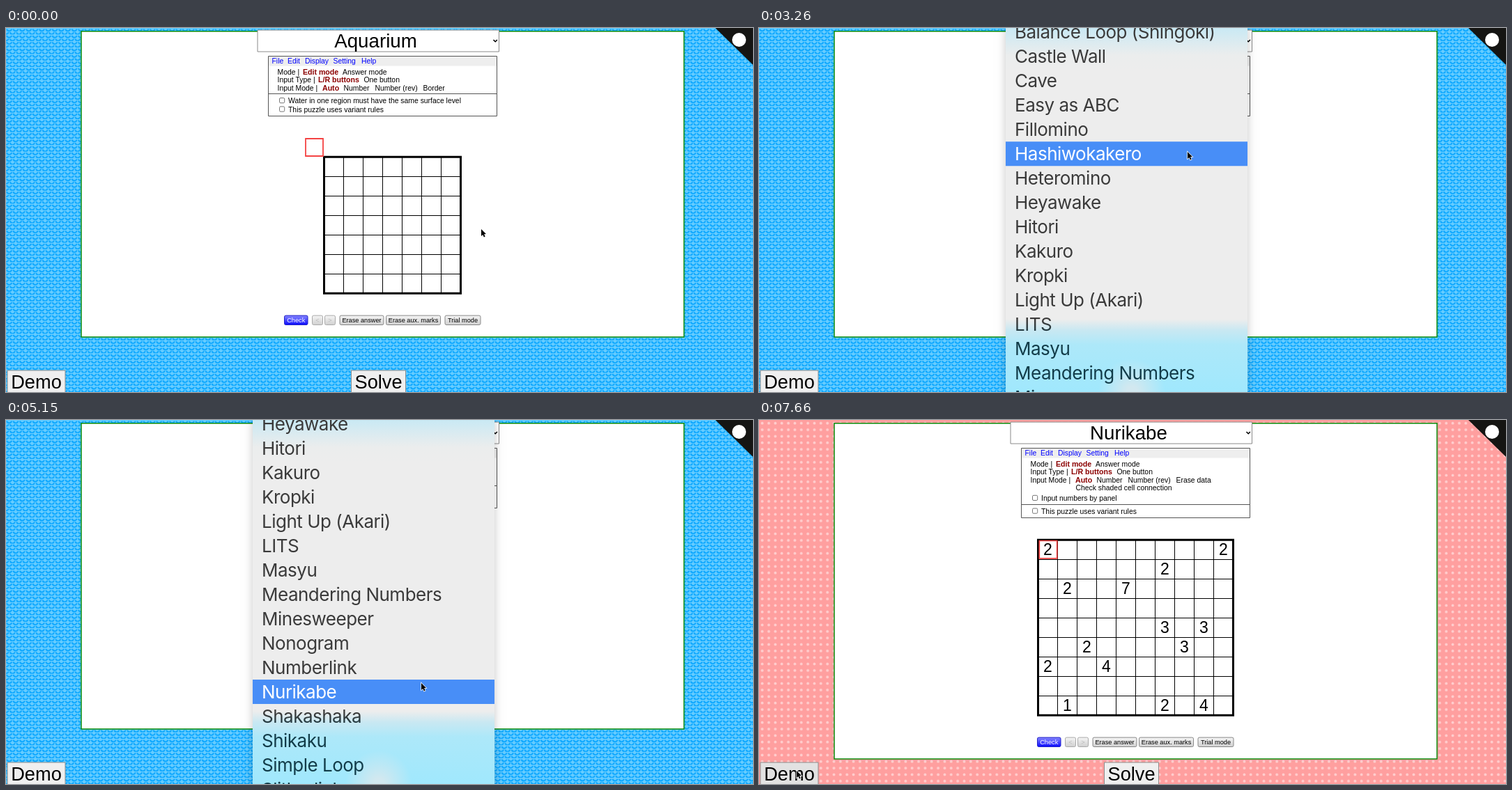
These frames come from a looping animation (1072 by 523 pixels, 8000 ms). An HTML page with a canvas:

```html
<!DOCTYPE html>
<html lang="en">
<head>
<meta charset="utf-8">
<title>Puzzle editor</title>
<style>
html, body { margin: 0; height: 100%; overflow: hidden; }
canvas { display: block; }
</style>
</head>
<body>
<canvas id="stage" width="1072" height="523"></canvas>
<script>
const c = document.getElementById('stage').getContext('2d');
const SANS = '"Liberation Sans", Arial, sans-serif';
const LOOP = 8000, TICK = 147.1;
const ROW = 34.95, MENU_TOP = 12, CELL = 28;

const NAMES = ['Aquarium', 'Balance Loop (Shingoki)', 'Castle Wall', 'Cave', 'Easy as ABC',
  'Fillomino', 'Hashiwokakero', 'Heteromino', 'Heyawake', 'Hitori', 'Kakuro', 'Kropki',
  'Light Up (Akari)', 'LITS', 'Masyu', 'Meandering Numbers', 'Minesweeper', 'Nonogram',
  'Numberlink', 'Nurikabe', 'Shakashaka', 'Shikaku', 'Simple Loop', 'Slitherlink', 'Spiral Galaxies'];

// One string per board row; dots are empty cells.
const CLUES = ['2........2', '......2...', '.2..7.....', '', '......3.3.',
  '..2....3..', '2..4......', '', '.1....2.4.'];

// Keys are [tick, ...values]
const POINTER = [[2, 682, 289], [6, 606, 24], [13, 606, 24], [20, 615, 178], [22, 615, 178],
  [27, 614, 184], [29, 614, 184], [35, 596, 378], [41, 596, 378], [50, 54, 504]];
const SCROLL = [[18, 0], [22, 58.5], [27, 221.5], [30, 303]];

const linear = u => u;
const smooth = u => u * u * (3 - 2 * u);

function track(keys, k, ease) {
  if (k <= keys[0][0]) return keys[0].slice(1);
  const i = keys.findIndex(key => key[0] >= k);
  if (i < 0) return keys[keys.length - 1].slice(1);
  const a = keys[i - 1], b = keys[i], u = ease((k - a[0]) / (b[0] - a[0]));
  return a.slice(1).map((v, j) => v + (b[j + 1] - v) * u);
}

function makePattern(paint) {
  const tile = document.createElement('canvas');
  tile.width = tile.height = 12;
  paint(tile.getContext('2d'));
  const pattern = c.createPattern(tile, 'repeat');
  pattern.setTransform(new DOMMatrix().scale(0.779));
  return pattern;
}

const waves = makePattern(g => {
  g.fillStyle = '#66ccff';
  g.fillRect(0, 0, 12, 12);
  g.strokeStyle = '#0aa6ff';
  g.lineWidth = 2.6;
  for (const [x, y] of [[6, 1], [0, 7], [12, 7]]) {
    g.beginPath();
    g.arc(x, y, 4.5, 0.2, Math.PI - 0.2);
    g.stroke();
  }
});

const dots = makePattern(g => {
  g.fillStyle = '#ff9f9f';
  g.fillRect(0, 0, 12, 12);
  g.fillStyle = '#ffcccc';
  g.beginPath();
  g.arc(6, 6, 2.5, 0, 7);
  g.fill();
});

function text(str, x, y, size, color = '#000', align = 'left', weight = '') {
  c.font = `${weight} ${size}px ${SANS}`;
  c.textAlign = align;
  c.fillStyle = color;
  c.fillText(str, x, y);
}

function box(x, y, w, h, fill, stroke, lineWidth = 1, radius = 0) {
  c.beginPath();
  c.roundRect(x, y, w, h, radius);
  if (fill) { c.fillStyle = fill; c.fill(); }
  if (stroke) { c.strokeStyle = stroke; c.lineWidth = lineWidth; c.stroke(); }
}

function line(x1, y1, x2, y2, color = '#000') {
  c.beginPath();
  c.moveTo(x1, y1);
  c.lineTo(x2, y2);
  c.strokeStyle = color;
  c.lineWidth = 1;
  c.stroke();
}

function gradient(y1, y2, ...stops) {
  const g = c.createLinearGradient(0, y1, 0, y2);
  stops.forEach(([at, color]) => g.addColorStop(at, color));
  return g;
}

function drawSelect(name, focused) {
  if (focused) box(361.5, 3, 346, 30.5, '#fff', '#0f63c0', 2, 3);
  else box(361, 3, 346.5, 31, '#fff', '#8a8a8a');
  text(name, 530.5, 28, 27.7, '#000', 'center');
  c.beginPath();
  c.moveTo(699.5, 17);
  c.lineTo(702.2, 19.7);
  c.lineTo(704.9, 17);
  c.strokeStyle = '#000';
  c.lineWidth = 1.6;
  c.stroke();
}

function checkbox(label, y) {
  box(392.5, y - 3.7, 7.2, 7.2, '#fff', '#767676', 1, 1.5);
  text(label, 405, y + 4.2, 10.4);
}

function drawPanel(nurikabe) {
  box(376.5, 40.5, 328, nurikabe ? 100 : 86, '#fff', '#555');
  box(377, 41, 327, 13.5, '#eee');
  [['File', 381.5], ['Edit', 404], ['Display', 429], ['Setting', 469.5], ['Help', 510]]
    .forEach(([s, x]) => text(s, x, 51.3, 10.4, '#00f'));
  const plain = (s, x, y) => text(s, x, y, 10.4);
  const bold = (s, x, y) => text(s, x, y, 10.6, '#8b0000', 'left', 'bold');
  plain('Mode |', 389.5, 66.8);
  bold('Edit mode', 426, 66.8);
  plain('Answer mode', 483, 66.8);
  plain('Input Type |', 389.5, 78);
  bold('L/R buttons', 448, 78);
  plain('One button', 513.5, 78);
  plain('Input Mode |', 389.5, 89.5);
  bold('Auto', 454, 89.5);
  plain('Number', 484.5, 89.5);
  plain('Number (rev)', 529.5, 89.5);
  plain(nurikabe ? 'Erase data' : 'Border', 598.5, 89.5);
  if (nurikabe) {
    plain('Check shaded cell connection', 454.5, 100.7);
    checkbox('Input numbers by panel', 112);
    line(377, 121.5, 704, 121.5, '#555');
    checkbox('This puzzle uses variant rules', 130.7);
  } else {
    line(377, 94.5, 704, 94.5, '#555');
    checkbox('Water in one region must have the same surface level', 104.2);
    checkbox('This puzzle uses variant rules', 116.6);
  }
}

function drawBoard(x, y, cols, rows, clues) {
  const w = cols * CELL, h = rows * CELL;
  for (let i = 1; i < cols; i++) line(x + i * CELL, y, x + i * CELL, y + h);
  for (let j = 1; j < rows; j++) line(x, y + j * CELL + 0.5, x + w, y + j * CELL + 0.5);
  box(x, y + 0.2, w, h, null, '#000', 3);
  clues.forEach((row, j) => [...row].forEach((d, i) => {
    if (d !== '.') text(d, x + (i + 0.5) * CELL, y + j * CELL + 21.8, 23, '#000', 'center');
  }));
}

function drawTools(y) {
  const face = gradient(y - 7, y + 7, [0, '#f6f6f6'], [1, '#cfcfcf']);
  const button = (label, x, w, fill = face, color = '#000', edge = '#888') => {
    box(x, y - 6.7, w, 13.4, fill, edge, 1, 2);
    text(label, x + w / 2, y + 3.1, 9.2, color, 'center');
  };
  button('Check', 399.5, 33.5, gradient(y - 7, y + 7, [0, '#8a8aff'], [1, '#0808ff']), '#fff', '#2222c8');
  button('<', 439.5, 15, face, '#bbb', '#aaa');
  button('>', 457.5, 15, face, '#bbb', '#aaa');
  button('Erase answer', 479, 63);
  button('Erase aux. marks', 545.5, 78);
  button('Trial mode', 630, 51);
}

function drawBigButton(label, x, w, fill) {
  box(x, 492, w, 36, fill, '#8c8c8c');
  text(label, x + w / 2, 518, 27.2, '#000', 'center');
}

function drawPage(pink, name, focused, filled, hover) {
  c.fillStyle = pink ? dots : waves;
  c.fillRect(0, 0, 1072, 523);
  const rows = pink ? (filled ? 9 : 10) : 7;
  const top = pink ? 172 : 185;
  const bottom = top + rows * CELL;
  box(108, 4.7, 865, bottom + 58.3, '#fff', '#0a8a0a', 1.5);
  drawSelect(name, focused);
  drawPanel(pink);
  if (pink) drawBoard(400.5, top, 10, rows, filled ? CLUES : []);
  else drawBoard(456.5, top, 7, rows, []);
  if (pink) box(402.3, 173.5, 25.4, 25.4, null, '#f44343', 1.7);
  else box(430, 159, 25, 25, null, '#f44343', 1.8);
  drawTools(bottom + 38.8);
  drawBigButton('Demo', 2, 83, hover ? '#e2e2e2' : '#efefef');
  drawBigButton('Solve', 495.5, 78, '#efefef');
  c.beginPath();
  c.moveTo(1018, 0);
  c.lineTo(1072, 0);
  c.lineTo(1072, 53);
  c.fillStyle = '#151513';
  c.fill();
  c.beginPath();
  c.arc(1052, 17, 10, 0, 7);
  c.fillStyle = '#fff';
  c.fill();
}

function drawMenu(scroll, active, alpha) {
  const top = Math.max(0, 11 - scroll);
  c.save();
  c.globalAlpha = alpha;
  c.shadowColor = 'rgba(0,0,0,.22)';
  c.shadowBlur = 12;
  box(354, top, 347, 540, '#ededed');
  c.shadowColor = 'transparent';
  c.beginPath();
  c.rect(354, top, 347, 523);
  c.clip();
  box(354, 0, 347, 523, gradient(0, 523, [0, '#c9e9f4'], [0.04, '#dcebf0'], [0.075, '#ebeded'],
    [0.12, '#ededed'], [0.8, '#ededed'], [0.83, '#c9e8f2'], [0.87, '#ade8f9'], [1, '#a0e8fd']));
  const glow = c.createRadialGradient(535, 523, 8, 535, 523, 48);
  glow.addColorStop(0, 'rgba(222,232,236,.8)');
  glow.addColorStop(1, 'rgba(222,232,236,0)');
  box(480, 470, 110, 53, glow);
  box(353.5, top - 0.5, 348, 560, null, 'rgba(0,0,0,.25)');

  const ink = gradient(422, 445, [0, '#3a3a3a'], [1, '#123c49']);
  c.textAlign = 'left';
  NAMES.forEach((name, i) => {
    const y = MENU_TOP + i * ROW - scroll;
    if (i === active) box(354, y, 347, ROW, '#488ef7');
    c.fillStyle = i === active ? '#fff' : ink;
    c.font = '26px Inter, sans-serif';
    c.letterSpacing = '-0.5px';
    c.fillText(name, 367, y + 26.8);
    if (i === 0) {
      c.beginPath();
      c.moveTo(358, y + 17.5);
      c.lineTo(360, y + 20);
      c.lineTo(363.5, y + 14.5);
      c.strokeStyle = c.fillStyle;
      c.lineWidth = 1.2;
      c.stroke();
    }
  });
  c.restore();
}

function drawPointer(x, y) {
  c.save();
  c.translate(x, y);
  c.beginPath();
  [[0, 0], [0, 10], [2.3, 8], [3.9, 11.6], [5.6, 10.8], [4.1, 7.3], [7, 7.1]]
    .forEach(p => c.lineTo(...p));
  c.closePath();
  c.strokeStyle = '#fff';
  c.lineWidth = 1.4;
  c.stroke();
  c.fillStyle = '#000';
  c.fill();
  c.restore();
}

function draw(time) {
  const k = Math.floor((time % LOOP) / TICK);
  const [x, y] = track(POINTER, k, smooth);
  const [scroll] = track(SCROLL, k, linear);
  const hover = x < 85 && y > 492;
  drawPage(k >= 41, k >= 40 ? 'Nurikabe' : 'Aquarium', k >= 40 && k < 51, k >= 52, hover);
  if (k >= 11 && k < 40) {
    // The chosen row blinks once before the menu fades
    const active = k === 37 ? -1 : Math.floor((y - MENU_TOP + scroll) / ROW);
    drawMenu(scroll, active, k === 39 ? 0.5 : 1);
  }
  drawPointer(x, y);
}

const start = performance.now();
function frame() {
  draw(performance.now() - start);
  requestAnimationFrame(frame);
}
frame();
</script>
</body>
</html>
```
